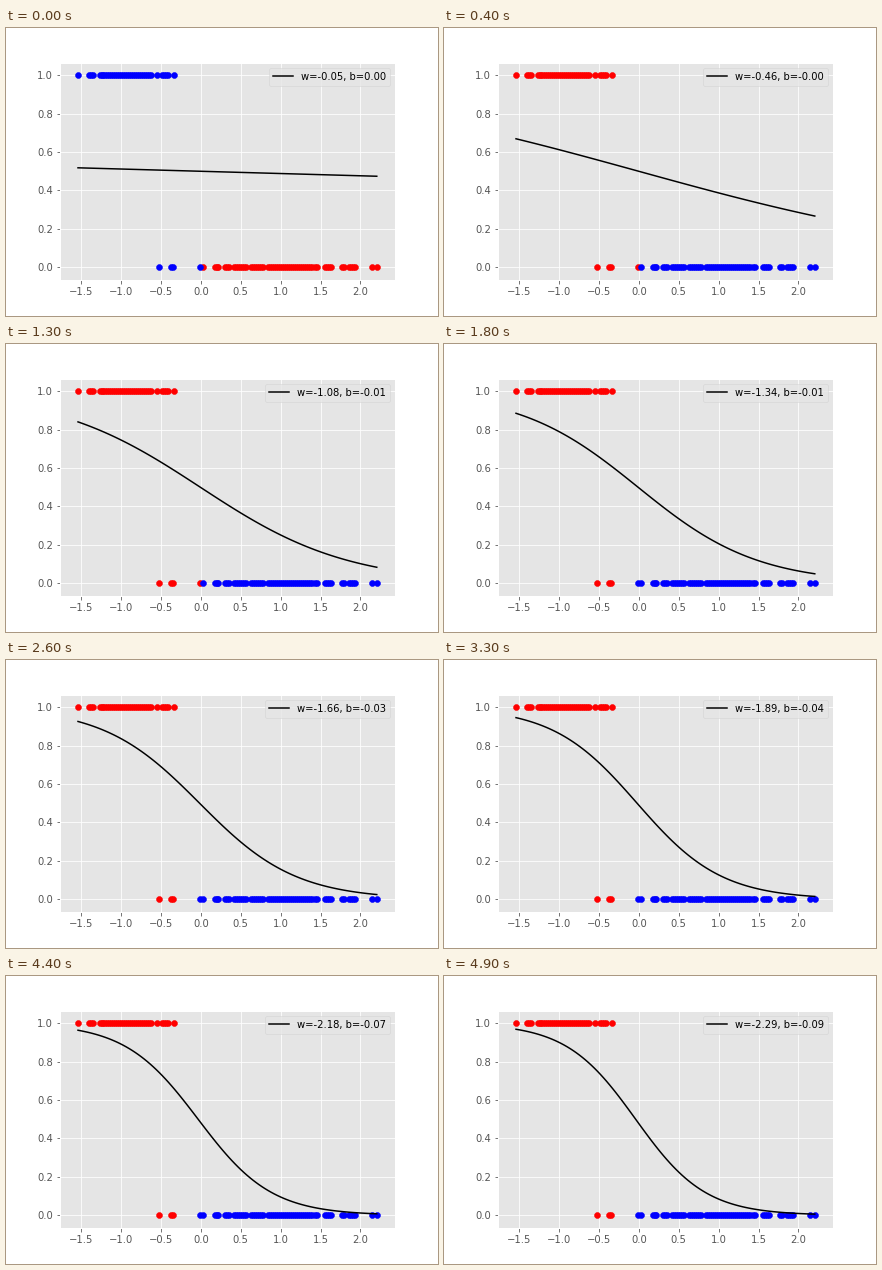
A matplotlib script that plays this animation: 432x288 px, repeating every 5000 ms.

```python
import numpy as np
import matplotlib.pyplot as plt
from matplotlib.animation import FuncAnimation

plt.style.use("ggplot")
plt.rcParams.update({"font.family": "DejaVu Sans", "font.size": 10})

FRAMES, INTERVAL = 50, 100
GAP = 0.025


def band(start, stop):
    """Evenly packed points; equal ends give a single point."""
    return np.linspace(start, stop, 1 + round((stop - start) / GAP))


def row(level, *bands):
    x = np.concatenate([band(*ends) for ends in bands])
    return np.c_[x, np.full(len(x), level)]


ones = row(1, (-1.54, -1.54), (-1.40, -1.35), (-1.27, -0.63),
           (-0.55, -0.55), (-0.49, -0.41), (-0.335, -0.335))
zeros = row(0, (-0.53, -0.53), (-0.37, -0.345), (-0.006, 0.025),
            (0.18, 0.22), (0.30, 0.35), (0.41, 0.56), (0.63, 0.78),
            (0.84, 1.45), (1.56, 1.63), (1.77, 1.79), (1.86, 1.93),
            (2.14, 2.14), (2.205, 2.205))
POINTS = np.vstack([ones, zeros])
X = POINTS[:, 0]
CURVE_X = np.linspace(X.min(), X.max(), 100)


def params(step):
    """Weight falls nearly linearly in log time, bias quadratically."""
    u = np.log1p(step / 12)
    w = -0.047 - 1.4395 * u + 0.0355 * u ** 2
    b = 1e-4 - 0.0915 * (step / 49) ** 2
    return w, b


fig, ax = plt.subplots(figsize=(6, 4), dpi=72, facecolor="white")
fig.subplots_adjust(left=0.125, right=0.9, bottom=0.125, top=0.88)
positive = ax.scatter([], [], s=36, color="red")
negative = ax.scatter([], [], s=36, color="blue")
curve, = ax.plot([], [], color="black", lw=1.5, label="w, b")
ax.set_xlim(-1.7657, 2.4308)
ax.set_ylim(-0.0664, 1.0664)
ax.set_xticks(np.arange(-1.5, 2.1, 0.5))
ax.set_yticks(np.linspace(0, 1, 6))
label = ax.legend(loc="upper right").get_texts()[0]


def update(frame):
    # Points are classified before the step, the curve is drawn after it.
    w, b = params(frame - 1)
    is_positive = w * X + b > 0
    positive.set_offsets(POINTS[is_positive])
    negative.set_offsets(POINTS[~is_positive])
    w, b = params(frame)
    curve.set_data(CURVE_X, 1 / (1 + np.exp(-(w * CURVE_X + b))))
    label.set_text(f"w={w:.2f}, b={b:.2f}")
    return positive, negative, curve, label


anim = FuncAnimation(fig, update, frames=FRAMES, interval=INTERVAL,
                     repeat=True, repeat_delay=0, blit=False)
plt.show()
```
